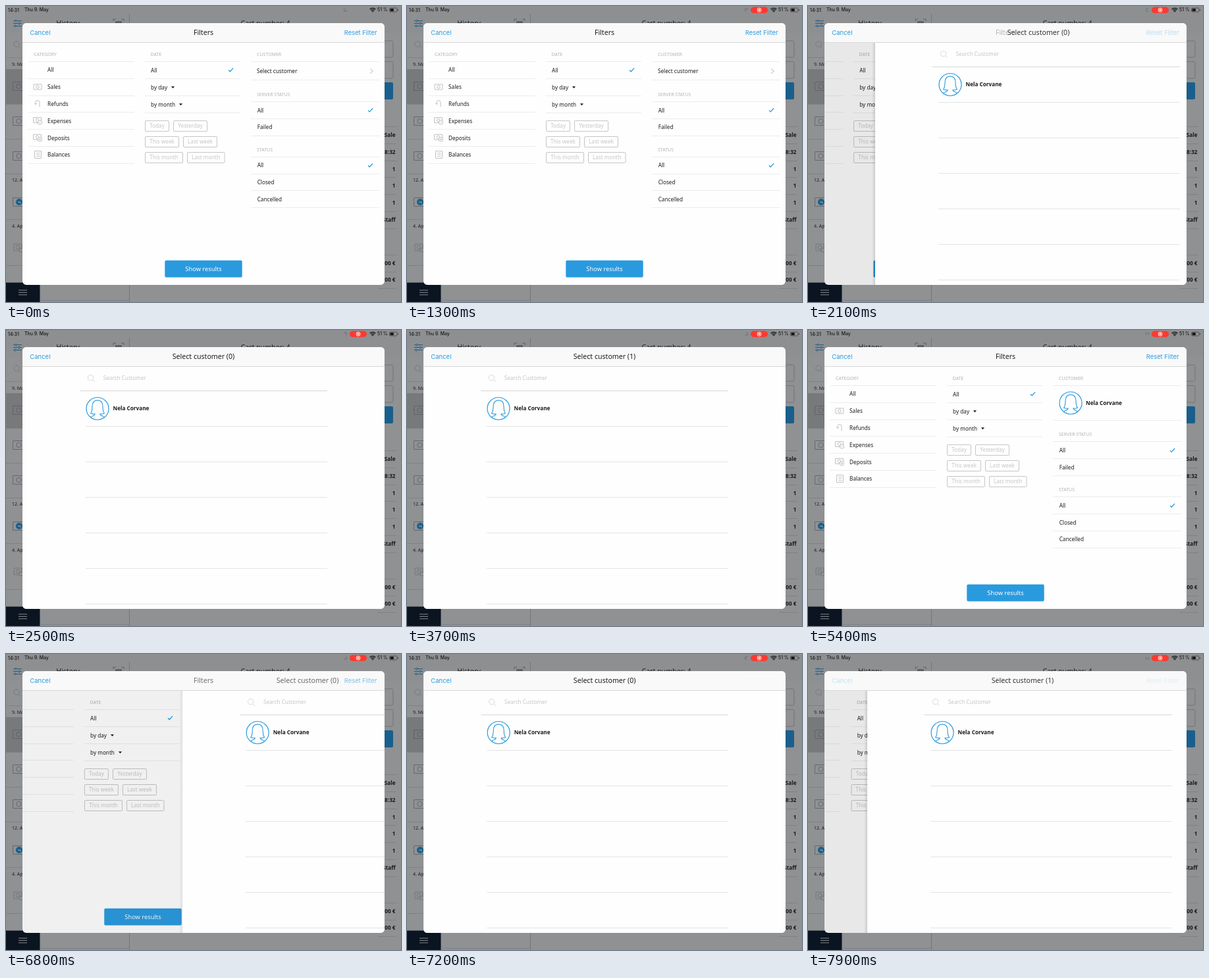
An HTML page with a canvas that plays this animation: 600x450 px, repeating every 8 s.

```html
<!DOCTYPE html>
<html lang="en">
<head>
<meta charset="utf-8">
<title>Filters</title>
<style>
html, body { margin: 0; width: 100%; height: 100%; overflow: hidden; background: #909193; }
canvas { display: block; width: 600px; height: 450px; }
</style>
</head>
<body>
<canvas id="stage"></canvas>
<script>
const canvas = document.getElementById('stage');
const ctx = canvas.getContext('2d');
const dpr = window.devicePixelRatio || 1;
canvas.width = 600 * dpr;
canvas.height = 450 * dpr;

const LOOP = 8000, SLIDE = 540, SHEET_W = 550;
const NOTO = '"Noto Sans", "Open Sans", sans-serif';
const INTER = 'Inter, Roboto, sans-serif';
const BLUE = '#2a9adf', INK = '#1c1c1c', RULE = '#ececec', PALE = '#c6c6c6', ICON = '#b2b2b2';
const CUSTOMER = 'Nela Corvane';

// Each screen change: start time and direction
const MOVES = [
  { at: 1907, push: true },
  { at: 4150, push: false },
  { at: 6689, push: true },
  { at: 7869, push: false }
];

// y of cubic-bezier(.36, .66, .04, 1) at x
function ease(x) {
  if (x <= 0) return 0;
  if (x >= 1) return 1;
  let lo = 0, hi = 1;
  for (let i = 0; i < 24; i++) {
    const u = (lo + hi) / 2, v = 1 - u;
    if (1.08 * u * v * v + 0.12 * u * u * v + u * u * u < x) lo = u; else hi = u;
  }
  const u = lo, v = 1 - u;
  return 1.98 * u * v * v + 3 * u * u * v + u * u * u;
}

function text(s, x, y, size = 8.2, color = INK, align = 'left', font = NOTO, weight = 400) {
  ctx.font = `${weight} ${size}px ${font}`;
  ctx.textAlign = align;
  ctx.fillStyle = color;
  ctx.fillText(s, x, y + size * 0.36);
}

function fill(x, y, w, h, color) {
  ctx.fillStyle = color;
  ctx.fillRect(x, y, w, h);
}

function hline(x1, x2, y, color = RULE) {
  fill(x1, Math.round(y - 0.5), x2 - x1, 1, color);
}

function box(x, y, w, h, r, stroke, fillColor, lw = 1) {
  ctx.beginPath();
  ctx.roundRect(x, y, w, h, r);
  if (fillColor) { ctx.fillStyle = fillColor; ctx.fill(); }
  if (stroke) { ctx.strokeStyle = stroke; ctx.lineWidth = lw; ctx.stroke(); }
}

function disc(x, y, r, stroke, fillColor, lw = 1) {
  ctx.beginPath();
  ctx.arc(x, y, r, 0, Math.PI * 2);
  if (fillColor) { ctx.fillStyle = fillColor; ctx.fill(); }
  if (stroke) { ctx.strokeStyle = stroke; ctx.lineWidth = lw; ctx.stroke(); }
}

function path(points, color, lw = 1) {
  ctx.beginPath();
  for (let i = 0; i < points.length; i += 2) ctx.lineTo(points[i], points[i + 1]);
  ctx.strokeStyle = color;
  ctx.lineWidth = lw;
  ctx.stroke();
}

function withAlpha(a, draw) {
  ctx.save();
  ctx.globalAlpha = Math.max(0, Math.min(1, a));
  draw();
  ctx.restore();
}

function lens(x, y, color) {
  disc(x - 1, y - 1, 4.2, color, null, 0.8);
  path([x + 2, y + 2, x + 5.5, y + 5.5], color, 0.8);
}

function check(x, y) {
  path([x - 3.5, y + 0.3, x - 1.2, y + 2.6, x + 3.6, y - 2.8], BLUE, 1.3);
}

function cash(x, y, color, w = 12, h = 8) {
  box(x - w / 2, y - h / 2, w, h, 0.5, color, null, 0.8);
  disc(x, y, h * 0.28, color, null, 0.8);
}

function badge(x, y, plus) {
  disc(x, y, 3.2, ICON, '#fff', 0.8);
  path([x - 1.6, y, x + 1.6, y], ICON, 0.7);
  if (plus) path([x, y - 1.6, x, y + 1.6], ICON, 0.7);
}

function avatar(x, y) {
  disc(x, y, 17, BLUE, null, 1.2);
  ctx.save();
  ctx.translate(x, y);
  ctx.beginPath();
  for (const s of [-1, 1]) {
    ctx.moveTo(0, -12.6);
    ctx.bezierCurveTo(s * 5.5, -12.6, s * 8, -8.5, s * 8, -3);
    ctx.bezierCurveTo(s * 8, 2, s * 8.8, 5, s * 10.4, 7.2);
    ctx.quadraticCurveTo(s * 7.5, 8.6, s * 4, 8);
    ctx.bezierCurveTo(s * 4, 10, s * 5, 10.4, s * 7.5, 11.2);
    ctx.quadraticCurveTo(s * 9.4, 11.9, s * 10.4, 13.2);
  }
  ctx.strokeStyle = BLUE;
  ctx.lineWidth = 1.1;
  ctx.stroke();
  ctx.restore();
}

function statusBar(t) {
  const dark = '#17181a';
  text('14:31', 3, 6, 7, dark, 'left', INTER, 500);
  text('Thu 9. May', 28, 6, 6.9, dark, 'left', INTER, 500);
  const a = t / 1000 * Math.PI * 2;
  ctx.beginPath();
  ctx.arc(515.5, 6, 2.2, a, a + 4.4);
  ctx.strokeStyle = '#626365';
  ctx.lineWidth = 0.8;
  ctx.stroke();
  if (t >= 100) {
    box(522, 1.5, 26, 9.3, 4.65, null, '#fb3a30');
    disc(535, 6.1, 3, '#fff', null, 0.9);
    disc(535, 6.1, 1.5, null, '#fff');
  }
  for (const r of [2.4, 4.3, 6.2]) {
    ctx.beginPath();
    ctx.arc(557, 9.2, r, -Math.PI * 0.76, -Math.PI * 0.24);
    ctx.strokeStyle = dark;
    ctx.lineWidth = 1.2;
    ctx.stroke();
  }
  disc(557, 8.7, 0.8, null, dark);
  text('51 %', 564, 6, 6.9, dark, 'left', INTER, 500);
  box(582.5, 3, 11.5, 6, 1.5, '#3a3b3d', null, 0.7);
  fill(583.6, 4, 5.2, 4, dark);
  fill(595, 5, 1, 2, '#3a3b3d');
}

function backdrop(t) {
  const rule = '#808184', mark = '#5c5e62', blue = '#1a5f8c';
  fill(0, 0, 600, 450, '#909193');
  fill(0, 0, 600, 41, '#8e8f91');
  fill(0, 96, 187, 53, '#78797b');
  statusBar(t);
  for (const [y, k] of [[22.5, 15], [26.5, 20], [30.5, 14]]) {
    path([11, y, 24, y], blue, 1);
    disc(k, y, 1.3, blue, '#8e8f91', 0.9);
  }
  text('History', 94, 26.5, 10.6, '#1d1e20', 'center');
  text('Cart number: 4', 394, 26.5, 10.6, '#1d1e20', 'center');
  path([163, 23, 163, 20, 167, 20], mark);
  path([175, 20, 179, 20, 179, 23], mark);
  fill(166, 23, 10, 3, mark);

  lens(17, 59, '#747578');
  for (const y of [78, 149, 202, 255, 324, 394]) hline(0, 187, y, rule);
  text('9. May', 9, 88, 7, '#202123');
  text('12. April', 9, 264, 7, '#202123');
  text('4. April', 9, 334, 7, '#202123');
  for (const y of [122, 175, 228, 298]) cash(19.5, y, mark, 18, 13);
  disc(20, 298, 5, null, blue);
  path([18, 298, 22, 298, 22, 300], '#b5c5d0', 0.8);
  cash(18, 367, '#6d6f72', 12, 10);
  disc(23, 371, 3, '#6d6f72', '#909193', 0.8);
  fill(187, 12, 1, 438, '#747578');

  fill(0, 420.5, 51.5, 29.5, '#0b1421');
  for (const y of [432, 435.5, 439]) path([19, y, 32, y], '#87898d', 1);
  hline(51.5, 187, 447, rule);

  box(400, 53, 188, 25, 2, '#747578');
  box(400, 84.5, 188, 25.5, 2, '#747578');
  box(400, 116, 188, 26, 2, null, blue);
  for (const y of [183, 209, 235, 260.5, 286.5, 312, 338, 378, 404, 429]) hline(565, 593, y, rule);
  const cells = [['Sale', 196], ['18:32', 222], ['1', 248], ['1', 273.5], ['1', 299], ['Staff', 325], ['0,00 €', 391], ['0,00 €', 416]];
  for (const [s, y] of cells) text(s, 591.5, y, 8.2, '#18191b', 'right', NOTO, 600);
}

function heading(s, x, y, x1, x2) {
  text(s, x, y, 7, '#b3b3b3');
  hline(x1, x2, y + 10.8);
}

function categories() {
  heading('CATEGORY', 42, 73.5, 33, 195);
  ['All', 'Sales', 'Refunds', 'Expenses', 'Deposits', 'Balances'].forEach((s, i) => {
    const y = 97.5 + i * 25.8;
    text(s, 63.1, y);
    hline(33, 195, y + 12.7);
  });
  cash(48, 123, ICON);
  ctx.beginPath();
  ctx.moveTo(45, 149);
  ctx.lineTo(45, 146.5);
  ctx.arc(48, 146.5, 3, Math.PI, 0);
  ctx.lineTo(51, 153.5);
  ctx.strokeStyle = ICON;
  ctx.lineWidth = 0.8;
  ctx.stroke();
  path([43, 147.5, 45, 149.8, 47, 147.5], ICON, 0.8);
  for (const y of [174, 199.8]) {
    cash(47.5, y - 0.5, ICON);
    badge(51.5, y + 3, y > 180);
  }
  box(43.5, 220.5, 10, 11, 0.5, ICON, null, 0.8);
  for (const y of [223.5, 226, 228.5]) path([46, y, 51.5, y], ICON, 0.7);
}

function dates() {
  heading('DATE', 219.5, 73.5, 211, 356);
  ['All', 'by day', 'by month'].forEach((s, i) => {
    text(s, 220.1, 97.6 + i * 26);
    hline(211, 356, 110.2 + i * 26);
  });
  check(341.5, 97.2);
  for (const [x, y] of [[253.5, 123.5], [265.5, 149.5]]) {
    ctx.beginPath();
    ctx.moveTo(x - 2.6, y - 1.2);
    ctx.lineTo(x + 2.6, y - 1.2);
    ctx.lineTo(x, y + 1.7);
    ctx.fillStyle = INK;
    ctx.fill();
  }
  const chips = [['Today', 36, 'Yesterday', 51], ['This week', 51, 'Last week', 51], ['This month', 57, 'Last month', 56.5]];
  chips.forEach(([a, wa, b, wb], i) => {
    const y = 174.5 + i * 24, x = 218.5 + wa;
    box(211.5, y, wa, 16, 1.5, PALE);
    box(x, y, wb, 16, 1.5, PALE);
    text(a, 211.5 + wa / 2, y + 8, 8.2, PALE, 'center');
    text(b, x + wb / 2, y + 8, 8.2, PALE, 'center');
  });
}

function group(title, rows, y) {
  heading(title, 381, y, 372, 567);
  rows.forEach((s, i) => {
    text(s, 381.7, y + 24.3 + i * 25.7);
    hline(372, 567, y + 37 + i * 25.7);
  });
  check(553.5, y + 24);
}

function customerColumn(chosen) {
  const d = chosen ? 24.5 : 0;
  heading('CUSTOMER', 381, 73.5, 372, 567);
  if (chosen) {
    avatar(399, 111);
    text(CUSTOMER, 422, 111, 8.2, INK, 'left', NOTO, 600);
  } else {
    text('Select customer', 381, 99.2);
    path([553.5, 95.5, 557.2, 99, 553.5, 102.5], '#b0b0b0', 1);
  }
  hline(372, 567, 112.5 + d);
  group('SERVER STATUS', ['All', 'Failed'], 134.3 + d);
  group('STATUS', ['All', 'Closed', 'Cancelled'], 218.2 + d);
}

function filterScreen(chosen) {
  categories();
  dates();
  customerColumn(chosen);
  box(241.3, 386.8, 117.4, 25.8, 2, null, BLUE);
  text('Show results', 300, 399.8, 9.3, '#fff', 'center');
}

function listScreen() {
  fill(25, 55, SHEET_W, 370, '#fefefe');
  lens(129.5, 73.5, '#d0d0d0');
  text('Search Customer', 147.8, 73.5, 8.1, PALE);
  hline(112, 488, 92.8, '#d6d6d6');
  avatar(139, 119.5);
  text(CUSTOMER, 162.5, 119.5, 8.2, INK, 'left', NOTO, 600);
  for (let i = 0; i < 6; i++) hline(121, 488, 146.8 + i * 53.9, '#e4e4e4');
}

function edgeShadow(x, strength) {
  const g = ctx.createLinearGradient(x - 5, 0, x, 0);
  g.addColorStop(0, 'rgba(0,0,0,0)');
  g.addColorStop(1, `rgba(0,0,0,${0.14 * strength})`);
  fill(x - 5, 55, 5, 370, g);
}

// open: 0 = filters, 1 = customer list
function navBar(open, push, count) {
  fill(25, 26, SHEET_W, 29, '#f9f9f9');
  hline(25, 575, 55.2, '#d8d8d8');
  const shut = 1 - open;
  const fade = push ? Math.pow(shut, 0.6) : shut;
  const cancel = push || open === 1 ? 1 : Math.pow(shut, 0.65);
  withAlpha(cancel, () => text('Cancel', 36.3, 40.5, 9.5, BLUE, 'left', INTER));
  withAlpha(fade, () => {
    text('Filters', 300, 40.5, 10.6, INK, 'center');
    text('Reset Filter', 563.5, 40.5, 9.4, BLUE, 'right', INTER);
  });
  const x = 300 + shut * SHEET_W * (push ? 0.65 : 0.4);
  withAlpha(push ? Math.pow(open, 0.75) : open, () =>
    text(`Select customer (${count})`, x, 40.5, 10.6, INK, 'center'));
}

function sheet(t) {
  const last = MOVES.filter(m => t >= m.at).pop();
  const p = last ? ease((t - last.at) / SLIDE) : 0;
  const push = !!last && last.push;
  const open = last ? (push ? p : 1 - p) : 0;
  const chosen = t >= 3500;
  const count = (t >= 3500 && t < 6000) || t >= 7350 ? 1 : 0;
  const off = SHEET_W * (1 - open);

  ctx.save();
  ctx.beginPath();
  ctx.roundRect(25, 26, SHEET_W, 398, 6);
  ctx.clip();
  fill(25, 26, SHEET_W, 399, '#fefefe');
  if (open < 1) {
    ctx.save();
    ctx.translate(-0.3 * SHEET_W * open, 0);
    filterScreen(chosen);
    ctx.restore();
  }
  if (open > 0) {
    fill(25, 55, SHEET_W, 370, `rgba(0,0,0,${0.1 * open})`);
    if (open < 1) edgeShadow(25 + off, open);
    ctx.save();
    ctx.translate(off, 0);
    listScreen();
    ctx.restore();
  }
  navBar(open, push, count);
  ctx.restore();
}

const start = performance.now();
function frame() {
  const t = (performance.now() - start) % LOOP;
  ctx.setTransform(dpr, 0, 0, dpr, 0, 0);
  backdrop(t);
  sheet(t);
  requestAnimationFrame(frame);
}
frame();
</script>
</body>
</html>
```
